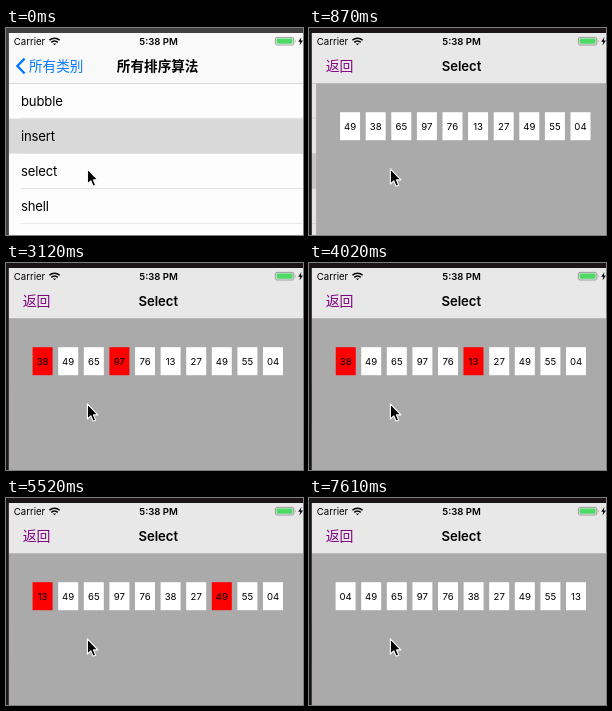
Write an HTML page that moves like this. It is 297 px wide and 207 px high and loops after 8 s.

```html
<!DOCTYPE html>
<html lang="zh-CN">
<head>
<meta charset="utf-8">
<title>Select sort</title>
<style>
html, body { margin: 0; width: 100%; height: 100%; overflow: hidden; background: #1c1517; }
svg { display: block; }
text { font-family: Inter, "Noto Sans CJK SC", "Noto Sans CJK", sans-serif; font-size: 12px; }
.mid { text-anchor: middle; }
.semi { font-weight: 600; }
.row { font-size: 16.4px; letter-spacing: -.2px; }
.nav { font-size: 17px; }
</style>
</head>
<body>
<svg width="297" height="207" viewBox="0 0 297 207">
  <defs>
    <linearGradient id="blend">
      <stop offset="0" stop-color="#e8e8e8" stop-opacity="0"/>
      <stop offset=".065" stop-color="#e8e8e8"/>
    </linearGradient>
  </defs>
  <!-- phone screen, in points -->
  <g transform="translate(2.6 4.2) scale(.8)">
    <rect width="375" height="260" fill="#fdfdfd"/>
    <g id="list"></g>
    <rect id="dim" width="375" height="260"/>
    <g id="detail"><rect width="375" height="260" fill="#aaa"/></g>

    <rect width="375" height="64" fill="#f9f9f9"/>
    <rect id="bar" x="-40" width="460" height="64" fill="url(#blend)"/>
    <rect y="64" width="375" height=".6" fill="#000" opacity=".3"/>
    <g id="back" fill="#007aff">
      <path d="M20 33l-9 9.3 9 9.3" fill="none" stroke="#007aff" stroke-width="3"/>
      <text class="nav" x="25.5" y="48.5">所有类别</text>
    </g>
    <text id="oldTitle" class="nav mid semi" x="186.3" y="48.5">所有排序算法</text>
    <text id="cancel" x="17.6" y="49" fill="#800080" style="font-size:17.4px">返回</text>
    <text id="newTitle" class="mid semi" x="187.1" y="48" style="font-size:16.4px">Select</text>

    <g transform="translate(0 .5)">
      <text x="6.5" y="15.2">Carrier</text>
      <g fill="none" stroke="#000" stroke-width="2">
        <path d="M51 9.6a9.2 9.2 0 0 1 12.8 0M53.4 12.2a5.8 5.8 0 0 1 8 0"/>
        <path d="M55.4 13.6h4l-2 2.2z" fill="#000" stroke="none"/>
      </g>
      <text class="mid semi" x="187.5" y="15.2">5:38 PM</text>
      <rect x="333.5" y="6" width="23" height="9.5" rx="2" fill="none" stroke="#888"/>
      <rect x="335" y="7.5" width="20" height="6.5" rx="1" fill="#4cd964"/>
      <path d="M358 9v3.5q1.5-1.7 0-3.5" fill="#888"/>
      <path d="M366 5.5l-4 6h2.6l-1 4.5 4.4-6h-2.8z"/>
    </g>
  </g>
  <path id="frame" d="M0 0H297V5H2.8V207H0z"/>
  <path d="M81.4 140.8v15.2l3.4-3.2 2.3 5.5 2.6-1.1-2.3-5.3h4.4z" stroke="#fff" stroke-width="1.1" stroke-linejoin="round"/>
</svg>
<script>
const $ = id => document.getElementById(id);
const LOOP = 8000, PUSH = 532, SORT = 1508;
const values = [49, 38, 65, 97, 76, 13, 27, 49, 55, 4];

function add(parent, tag, attrs, text = '') {
  const el = document.createElementNS('http://www.w3.org/2000/svg', tag);
  for (const key in attrs) el.setAttribute(key, attrs[key]);
  el.textContent = text;
  return parent.appendChild(el);
}

const rows = ['bubble', 'insert', 'select', 'shell', ''].map((name, i) => {
  const y = 64 + 44 * i;
  const cell = add($('list'), 'rect', { y, width: 375, height: 44 });
  add($('list'), 'rect', { x: 15, y: y + 43, width: 360, height: 1, fill: '#dcdcdf' });
  add($('list'), 'text', { class: 'row', x: 15.5, y: y + 27.8 }, name);
  return cell;
});

const cards = values.map(v => {
  const g = add($('detail'), 'g', {});
  const box = add(g, 'rect', { y: 100, width: 25, height: 35 });
  add(g, 'text', { class: 'mid', x: 12.5, y: 121.8 }, String(v).padStart(2, '0'));
  return { g, box };
});

const shift = (el, x) => el.setAttribute('transform', `translate(${x} 0)`);
const fade = (id, a) => $(id).setAttribute('opacity', a);

// cubic-bezier(.42, 0, .58, 1)
function ease(x) {
  if (x >= 1) return 1;
  let lo = 0, hi = 1, s;
  for (let i = 0; i < 20; i++) {
    s = (lo + hi) / 2;
    if (1.26 * s * (1 - s) ** 2 + 1.74 * s * s * (1 - s) + s ** 3 < x) lo = s; else hi = s;
  }
  return s * s * (3 - 2 * s);
}

function drawPush(t) {
  // critically damped spring; rest runs from 1 to 0
  const w = Math.max(0, t - PUSH) * .01826;
  const rest = t > 1100 ? 0 : (1 + w) * Math.exp(-w);
  const picked = rest < 1 ? 2 : 1;
  rows.forEach((cell, i) => cell.setAttribute('fill', i === picked ? '#d9d9d9' : '#fdfdfd'));
  shift($('list'), -112.5 * (1 - rest));
  shift($('detail'), 375 * rest);
  shift($('bar'), 420 * rest);
  shift($('back'), -60 * (1 - rest));
  shift($('oldTitle'), -125 * (1 - rest));
  shift($('newTitle'), 20 * rest);
  fade('dim', .1 * (1 - rest));
  fade('back', rest ** 2);
  fade('oldTitle', rest ** 2);
  fade('cancel', 1 - rest);
  fade('newTitle', 1 - rest);
  $('frame').setAttribute('fill', rest < 1 ? '#1c1517' : '#434041');
}

function drawSort(t) {
  const order = values.map((_, i) => i);
  const slots = [...order];
  const red = new Set();
  let clock = SORT;
  for (let j = 1; j < 10 && t >= clock; j++) {
    red.delete(order[j - 1]);
    red.add(order[j]);
    const [a, b] = [order[0], order[j]];
    if (values[b] < values[a]) {
      const k = ease((t - clock) / 500);
      slots[a] = j * k;
      slots[b] = j * (1 - k);
      [order[0], order[j]] = [b, a];
      clock += 500;
    }
    clock += 500;
    if (j === 9 && t >= clock) red.clear();
  }
  cards.forEach(({ g, box }, i) => {
    shift(g, 30 + 32 * slots[i]);
    box.setAttribute('fill', red.has(i) ? '#f00' : '#fff');
  });
}

// the picture advances in 150 ms steps
function snap(t) {
  const base = t < 6300 ? 120 : 110;
  return Math.floor((t - base) / 150) * 150 + base;
}

const start = performance.now();
function tick() {
  const t = snap((performance.now() - start) % LOOP);
  drawPush(t);
  drawSort(t);
  requestAnimationFrame(tick);
}
tick();
</script>
</body>
</html>
```
